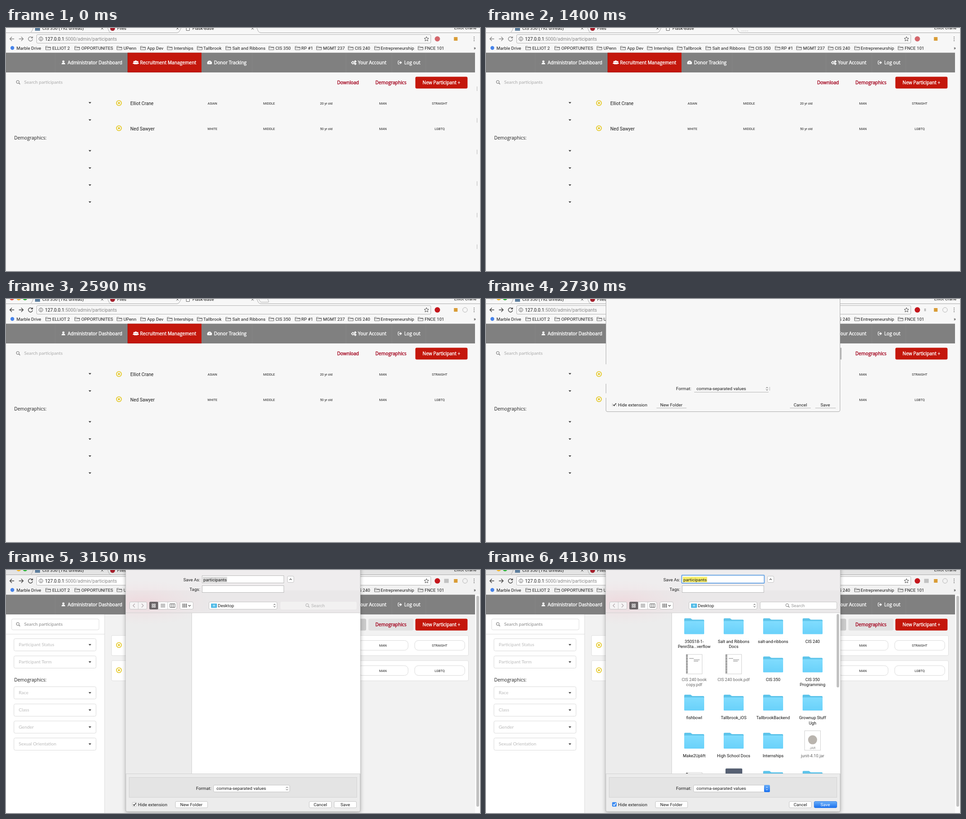
Animation, 1045 px wide and 536 px high, one loop 4.2 s. Source, as an HTML page:

```html
<!DOCTYPE html>
<html lang="en">
<head>
<meta charset="utf-8">
<title>Participants</title>
<style>
html, body { margin: 0; width: 100%; height: 100%; overflow: hidden; background: #f7f7f7; }
svg { display: block; width: 1045px; height: 536px; }
text { font: 9.75px Roboto, sans-serif; fill: #1c1c1c; }
.url { font-size: 10.2px; }
.name { font-size: 10.16px; }
.tag { font-size: 7.26px; }
.file { font-size: 9.3px; }
.web { font: 10.16px "Open Sans", sans-serif; }
.field { font: 10.16px Lato, sans-serif; fill: #bbb; }
.bold { stroke: currentColor; stroke-width: .4px; }
.mid { text-anchor: middle; }
.end { text-anchor: end; }
.nav { fill: #fff; color: #fff; }
.link { fill: #a3001c; color: #a3001c; }
</style>
</head>
<body>
<svg id="stage" viewBox="0 0 1045 536"></svg>
<script>
const LOOP = 4200, STEP = 70;
const FOCUS = 1750, SHEET = 2596, SHARP = 2800, READY = 3430;

const text = (x, y, s, cls = '', fill = '') =>
  `<text x="${x}" y="${y}" class="${cls}"${fill && ` style="fill:${fill}"`}>${s}</text>`;
const rect = (x, y, w, h, fill, line = 'none', r = 0) =>
  `<rect x="${x}" y="${y}" width="${w}" height="${h}" rx="${r}" fill="${fill}" stroke="${line}"/>`;
const path = (d, line, w = 1, fill = 'none', more = '') =>
  `<path d="${d}" stroke="${line}" stroke-width="${w}" fill="${fill}" ${more}/>`;
const dot = (x, y, r, fill, line = 'none', w = 1) =>
  `<circle cx="${x}" cy="${y}" r="${r}" fill="${fill}" stroke="${line}" stroke-width="${w}"/>`;
const during = (from, to, ...parts) => `<g data-from="${from}" data-to="${to}">${parts.join('')}</g>`;
const dash = (a, b) => `stroke-dasharray="${a} ${b}"`;
const lens = (x, y, c) => dot(x, y, 3.2, 'none', c) + path(`M${x + 2.4} ${y + 2.4}l2.6 2.6`, c, 1.3);
const updown = (x, y, c) => path(`M${x - 2} ${y - 1.3}l2-2.2 2 2.2m-4 2.6l2 2.2 2-2.2`, c);

function tabs() {
  const close = x => path(`M${x - 2.5} -1.5l5 5m0-5l-5 5`, '#555');
  const lights = first => dot(13, -2, 5, first) + dot(28, -2, 5, '#f3b72c') + dot(42, -2, 5, '#2fb83c');
  return [
    during(SHARP, LOOP, rect(0, 0, 1045, 10.5, '#e4e4e4')),
    path('M0 10.5H53Q56 10 58 5L60 0M224 0L227 7Q229 10.5 233 10.5H377Q381 10.5 383 6L386 0M230 5L233 0M553 0L556 7Q558 10.5 562 10.5H1045M233 10.5H55', '#aaa'),
    rect(64, -5, 11, 11, '#5c7d9c'), text(80, 4.3, 'CIS 350 (192 unread)'), close(212),
    dot(235, 1, 5.3, '#a5202c'), text(245, 4.3, 'Files'), close(378),
    path('M397.5 -4V5.5H404.5V-4', '#666', 1, '#fff'), text(411, 4.3, 'Flask-Base'), close(543.5),
    text(988, 2.5, 'Elliot Crane'),
    during(350, FOCUS, path('M563 6.5H579', '#ccc', 1, 'none', dash(3, 1))),
    during(FOCUS, LOOP, path('M557 0l3 5q1 2 3 2h15q2 0 1-2l-2-5', '#aaa')),
    during(FOCUS, SHEET, lights('#ee5148')),
    during(SHEET, LOOP, lights('#e7e4e4'))
  ].join('');
}

function toolbar() {
  const arrows = c =>
    path('M18 24H8.5M13 19.5L8.5 24L13 28.5M28.5 24H38M33.5 19.5L38 24L33.5 28.5', c, 1.4) +
    path('M57.7 21.2A4.7 4.7 0 1 0 58.6 25M58.6 18.8V22H55.2', c, 1.4);
  const box = more => path('M70 14.5H934Q936.5 14.5 936.5 17V31Q936.5 33.5 934 33.5H70Q67.5 33.5 67.5 31V17Q67.5 14.5 70 14.5', '#b5b5b5', 1, 'none', more);
  const marks = [
    [87, 102, 'ELLIOT 2'], [151, 166, 'OPPORTUNITES'], [244, 259, 'UPenn'], [296, 311, 'App Dev'],
    [355, 370, 'Interships'], [421, 435, 'Tallbrook'], [484, 499, 'Salt and Ribbons'], [579, 594, 'CIS 350'],
    [637, 651, 'RP #1'], [684, 699, 'MGMT 237'], [754, 769, 'CIS 240'],
    [812, 826, 'Entrepreneurship'], [908, 923, 'FNCE 101']
  ];
  return [
    during(0, FOCUS, arrows('#8a8a8a'), box()),
    during(FOCUS, 2310, arrows('#444'), box(dash(32, 14.5))),
    during(2310, SHARP, arrows('#444'), box()),
    during(SHARP, LOOP, arrows('#444'), rect(67.5, 14.5, 869, 19, '#fff', '#b5b5b5', 2)),
    dot(77, 24, 4.2, 'none', '#555'), path('M77 23.3V26.6M77 21.2V22.3', '#555', 1.2),
    text(86, 27.6, '127.0.0.1<tspan fill="#888">:5000/admin/participants</tspan>', 'url'),
    path('M927 19l1.4 3.4 3.6.3-2.7 2.4.8 3.5-3.1-1.9-3.1 1.9.8-3.5-2.7-2.4 3.6-.3z', '#555'),
    during(0, FOCUS, dot(951, 24, 5.8, '#d4656b')),
    during(FOCUS, LOOP, dot(951, 24, 6, '#c4161c')),
    during(SHEET, SHARP, rect(966, 21, 4, 6, '#c4c4c4')),
    during(SHARP, LOOP, rect(966, 19.5, 10, 9, '#c2c2c2')),
    rect(987.5, 20, 8, 8, '#d99c35'),
    during(2310, LOOP, dot(1012, 24, 5.2, 'none', '#b5b5b5')),
    [20, 24, 28].map(y => dot(1032, y, 1, '#666')).join(''),
    dot(14, 44, 4.2, '#4683ea'), text(23, 47.5, 'Marble Drive'),
    marks.map(([x, tx, s]) =>
      path(`M${x + .5} 48V40.5H${x + 4.5}L${x + 6} 42H${x + 11.5}V48ZM${x + .5} 43.5H${x + 11.5}`, '#666') +
      text(tx, 47.5, s)).join(''),
    text(1031, 48, '»', 'name')
  ].join('');
}

function navbar() {
  const person = (x, s = 1) => `<g transform="translate(${x} 76) scale(${s})">${dot(0, -2, 2.4, '#fff')}${path('M-4 4Q-4 0 0 .5Q4 0 4 4Z', 'none', 0, '#fff')}</g>`;
  const cog = (x, y, r) => dot(x, y, r, 'none', '#fff', 1.5) + path(`M${x - r - 1.5} ${y}h1.5m${2 * r} 0h1.5M${x} ${y - r - 1.5}v1.5m0 ${2 * r}v1.5`, '#fff', 1.3);
  const item = (x, s) => text(x, 79.8, s, 'web bold nav');
  return [
    rect(0, 54.5, 1034, 43.5, '#808080'), rect(268, 54.5, 163, 43, '#c4170c'),
    path('M108.5 55V98M542.5 55V98M749.5 55V98M850.5 55V98M925.5 55V98', '#868686'),
    path('M268.5 55V97.5H431', '#a81006'),
    person(126.5), item(136, 'Administrator Dashboard'),
    person(282.5, .75), person(290, .75), person(286.2), item(295.5, 'Recruitment Management'),
    path('M444.5 79.5a4.8 4.8 0 1 1 8.4 0z', '#fff', 1, '#fff'), path('M448.5 78l1.4-4', '#808080'), item(458.5, 'Donor Tracking'),
    cog(764.7, 76.5, 2.3), cog(770, 73.8, 1.2), cog(770, 79, 1.2), item(776, 'Your Account'),
    path('M867.5 72.5H865.5Q864.5 72.5 864.5 74V78.5Q864.5 80 865.5 80H867.5', '#fff', 1.2),
    path('M867 75h2.3v-2.3l3.5 3.6-3.5 3.6v-2.3h-2.3z', 'none', 0, '#fff'), item(878, 'Log out')
  ].join('');
}

function page() {
  const rows = [165, 203, 271, 309, 346.5, 384];
  const labels = ['Participant Status', 'Participant Term', 'Race', 'Class', 'Gender', 'Sexual Orientation'];
  const cols = [455, 580, 706, 831, 956];
  const people = [
    [166, 'Elliot Crane', ['ASIAN', 'MIDDLE', '20 yr old', 'MAN', 'STRAIGHT']],
    [221.5, 'Ned Sawyer', ['WHITE', 'MIDDLE', '50 yr old', 'MAN', 'LGBTQ']]
  ];
  return [
    during(SHARP, LOOP,
      rect(0, 98, 217, 438, '#fff'), path('M217.5 98V536M0 141.5H217', '#ddd'),
      rect(12.5, 108, 192.5, 24, '#fff', '#dcdcdc', 3),
      rows.map((y, i) => rect(17.5, y - 13.5, 181, 27, '#fff', '#dadada', 3) + text(28, y + 3.4, labels[i], 'field')).join(''),
      people.map(([y]) => rect(232.5, y - 21.7, 787, 44.5, '#fff', '#dedede', 3) +
        cols.map(x => rect(x - 55, y - 10.5, 110.5, 21.5, '#fff', '#dadada', 8)).join('')).join(''),
      rect(713, 107.5, 81, 26, '#cacaca', 'none', 3), rect(799, 107.5, 99, 26, '#e2e2e2', 'none', 3),
      rect(1034, 54, 11, 482, '#fafafa'), rect(1037, 57, 6, 465, '#c1c1c1', 'none', 3)),
    during(SHEET, SHARP, rect(713, 107.5, 71, 26, '#bbb')),
    lens(26, 119, '#666'),
    during(0, SHARP, text(40, 123.4, 'Search participants', 'field', '#aaa')),
    during(SHARP, LOOP, text(40, 123.4, 'Search participants', 'field', '#888')),
    rows.map(y => path(`M182 ${y - 1.5}h6l-3 3.3z`, 'none', 0, '#333')).join(''),
    text(18, 245.5, 'Demographics:', 'web'),
    people.map(([y, name, tags]) =>
      dot(249, y - .5, 5.4, 'none', '#e6cc35', 1.9) + dot(249, y - .5, 2.2, '#e6c520') +
      text(274, y + 4, name, 'name') +
      tags.map((s, i) => text(cols[i], y + 3, s, 'tag mid')).join('')).join(''),
    text(754, 124, 'Download', 'web mid bold link'), text(848.5, 124, 'Demographics', 'web mid link bold'),
    rect(902.5, 107.5, 115, 26, '#c4170c', 'none', 3), text(960, 124, 'New Participant +', 'web mid bold nav'),
    during(0, 350, path('M1038.5 129V488', '#bbb', 1, 'none', dash(10, 59.7))),
    during(350, 1050, path('M1037.5 139V489', '#bbb', 1, 'none', dash(24, 22.5)))
  ].join('');
}

function files() {
  const X = [459, 546, 633, 720], top = r => 106 + 84.2 * r;
  const folder = (x, y) =>
    path(`M${x - 22} ${y + 2.5}q0-2 2-2h12l4 3h24q2 0 2 2v27q0 2-2 2h-40q-2 0-2-2z`, 'none', 0, '#5ec4ea') +
    rect(x - 22, y + 6.5, 44, 29, 'url(#folder)', 'none', 1.5);
  const sheet = (x, y) => rect(x - 17.5, y - 4, 35, 43, '#fff', '#d0d0d0');
  const book = (x, y) => sheet(x, y) + path(`M${x - 16} ${y - 3}V${y + 38}`, '#444', 4, 'none', dash(1.5, 2)) +
    path(`M${x - 11} ${y + 5}h10m0 3h13m-13 3h10`, '#999', 1.3);
  const jar = (x, y) => sheet(x, y) + dot(x, y + 16, 10, '#b9b4ae') + text(x, y + 36, 'JAR', 'tag mid', '#888');
  const cover = (x, y) => rect(x - 18, y - 5, 37, 44, '#566072', 'none', 2);
  const grid = [
    ['350S18-1-|PennSta...verflow', 'Salt and Ribbons|Docs', 'salt-and-ribbons', 'CIS 240'],
    ['CIS 240 book|copy.pdf', 'CIS 240 book.pdf', 'CIS 350', 'CIS 350|Programming'],
    ['fishbowl', 'Tallbrook_iOS', 'TallbrookBackend', 'Grownup Stuff|Ugh'],
    ['Make2Uplift', 'High School Docs', 'Internships', 'junit-4.10.jar'],
    ['', '', '', '']
  ];
  const icon = (r, c) => r == 4 && c == 1 ? cover : r == 4 && c == 0 ? (x, y) => book(x, y + 8)
    : r == 1 && c < 2 ? book : r == 3 && c == 3 ? jar : folder;
  const cell = (s, r, c) => {
    const draw = icon(r, c);
    return draw(X[c], top(r)) + s.split('|').map((line, i) =>
      text(X[c], top(r) + 54.5 + 11.7 * i, line, 'file mid', draw == folder ? '#111' : '#666')).join('');
  };
  return `<g clip-path="url(#list)">${grid.map((row, r) => row.map((s, c) => cell(s, r, c)).join('')).join('')}</g>` +
    rect(773, 97, 5.5, 162, '#c1c1c1', 'none', 2.7);
}

function saveSheet() {
  const button = (x, y, w, h = 15, fill = '#fff') => rect(x + .5, y + .5, w - 1, h - 1, fill, '#c4c4c4', 2.5);
  const tick = c => path('M280.5 517l2 2.5 4-5.5', c, 1.4);
  const grid = (x, c) => [0, 4.5].map(a => [0, 4.5].map(b => rect(x + a, 75 + b, 2.8, 2.8, 'none', c)).join('')).join('');
  const pale = during(0, SHARP,
    path('M264 0H781V530Q781 533 778 533H267Q264 533 264 530Z', 'none', 0, '#f7f7f7'),
    path('M264.5 283V428M264.5 471V492M264.5 502V530Q265 532.5 268 532.5H777Q780.5 532.5 780.5 529V283', '#aaa'),
    path('M459 489.5H623M625.5 478V486M376 524.5H442M670 524.5H716M726 524.5H771', '#b5b5b5'),
    path('M278.5 514V521M287.5 514V521', '#bbb'), tick('#333'));
  const full = during(SHARP, LOOP,
    '<rect x="264" y="-20" width="517" height="553" rx="3" fill="#ececec" stroke="#b0b0b0" filter="url(#shade)"/>',
    rect(264.5, 0, 516, 94, '#efedee'),
    rect(264.5, 45, 516, 49, '#eae8e9'),
    rect(264, 95, 146, 354, '#ececec'), rect(410, 95, 371, 354, '#fff'),
    '<ellipse cx="300" cy="72" rx="155" ry="50" fill="url(#glow)" clip-path="url(#inside)"/>',
    path('M264 94.5H781M264 449.5H781M409.5 95V449', '#d2d2d2'),
    text(428, 24.6, 'Save As:', 'end'), text(428, 46, 'Tags:', 'end'),
    rect(432.5, 12.5, 180, 16, '#fff', '#bbb'), rect(432.5, 34.5, 180, 15, '#fff', '#bbb'),
    during(SHARP, READY, rect(434, 15, 53.5, 12, '#dadada')),
    during(READY, LOOP, '<rect x="431.5" y="11.5" width="182" height="17.5" fill="#fff" stroke="#6ba5e4" stroke-width="2" rx="1"/>', rect(434, 15, 53.5, 12, '#f7ef6a')),
    text(435, 24.6, 'participants'),
    button(620, 13, 15), path('M625 21.8l2.5-2.5 2.5 2.5', '#444', 1.2),
    button(272, 70, 39, 17, '#f6f4f5'), path('M291.5 71V86', '#ccc'),
    path('M284 74.5l-4 4 4 4M299 74.5l4 4-4 4', '#b0a9ab', 1.2),
    button(316, 70, 61, 17), rect(316, 70, 19.5, 17, '#6a6567', 'none', 2.5), grid(322, '#fff'),
    path('M341 75.5h10M341 78.5h10M341 81.5h10', '#555'),
    path('M356.5 71V86', '#ccc'), path('M361.5 74.5h11v8h-11zM365.2 75v8M368.8 75v8', '#555'),
    button(383, 70, 30, 17), path('M389 75.5h10M389 78.5h10M389 81.5h10', '#555', 2, 'none', dash(2.5, 1.2)), path('M402 77.5l2.5 2.5 2.5-2.5', '#444', 1.2),
    button(447, 70, 151, 17), rect(452, 74, 13, 9.5, '#4fb9e6', 'none', 1), rect(456, 76.5, 5, 4, '#9ee0f7'),
    text(467, 82, 'Desktop'), updown(592, 78.5, '#444'),
    during(SHARP, READY, rect(605, 70, 168, 17, '#f2f1f1', 'none', 3), lens(664, 77.5, '#aaa'), text(673, 82, 'Search', '', '#b5b5b5')),
    during(READY, LOOP, button(604, 70, 170, 17), lens(664, 77.5, '#777'), text(673, 82, 'Search', '', '#999'), files()),
    rect(271.5, 457.5, 502, 44, '#e4e4e4', '#d4d4d4'),
    button(457, 474, 169, 16), button(373, 510, 72), button(668, 510, 50),
    during(SHARP, READY, button(723, 510, 50), rect(278.5, 512.5, 9, 9, '#fff', '#bbb', 2), tick('#333'), updown(619.5, 482, '#444')),
    during(READY, LOOP,
      rect(723.5, 510.5, 50, 14, 'url(#blue)', '#3a82e8', 2.5), rect(278, 512, 10, 10, '#3d8cf2', 'none', 2), tick('#fff'),
      rect(613, 474, 13, 16, 'url(#blue)', 'none', 2.5), updown(619.3, 482, '#fff')));
  return pale + full + [
    text(452.5, 484.8, 'Format:', 'end'), text(464, 485.2, 'comma-separated values'),
    during(0, SHARP, updown(619.5, 482, '#444')),
    text(291, 520.8, 'Hide extension'), text(408.5, 520.8, 'New Folder', 'mid'), text(693, 520.8, 'Cancel', 'mid'),
    during(0, READY, text(748, 520.8, 'Save', 'mid')),
    during(READY, LOOP, text(748, 520.8, 'Save', 'mid', '#fff'))
  ].join('');
}

const defs = `<defs>
  <clipPath id="list"><rect x="410" y="95" width="371" height="354"/></clipPath>
  <clipPath id="inside"><rect x="264.5" y="0" width="516" height="125"/></clipPath>
  <radialGradient id="glow"><stop stop-color="#f3c9d1" stop-opacity=".5"/><stop offset="1" stop-color="#f3dde1" stop-opacity="0"/></radialGradient>
  <linearGradient id="blue" x2="0" y2="1"><stop stop-color="#69aef8"/><stop offset="1" stop-color="#1a70ee"/></linearGradient>
  <linearGradient id="folder" x2="0" y2="1"><stop stop-color="#80dcfe"/><stop offset="1" stop-color="#69d1fa"/></linearGradient>
  <filter id="shade" x="-5%" y="-5%" width="110%" height="110%"><feDropShadow dx="0" dy="2" stdDeviation="4" flood-opacity=".3"/></filter>
</defs>`;

const stage = document.getElementById('stage');
stage.innerHTML = defs + rect(0, 0, 1045, 536, '#f7f7f7') +
  during(SHARP, LOOP, rect(0, 0, 1045, 536, '#f2f2f2')) +
  tabs() + toolbar() + navbar() + page() + `<g id="sheet">${saveSheet()}</g>`;

const sheet = document.getElementById('sheet');
const timed = [...stage.querySelectorAll('[data-from]')];

function draw(now) {
  const t = Math.floor(now % LOOP / STEP) * STEP;
  for (const g of timed) g.style.display = t >= g.dataset.from && t < g.dataset.to ? '' : 'none';
  const p = Math.min(1, Math.max(0, (t - SHEET) / 280));
  sheet.style.display = p ? '' : 'none';
  sheet.setAttribute('transform', `translate(0 ${Math.round(-533 * (1 - p * p * (3 - 2 * p)))})`);
  requestAnimationFrame(draw);
}
draw(performance.now());
</script>
</body>
</html>
```
